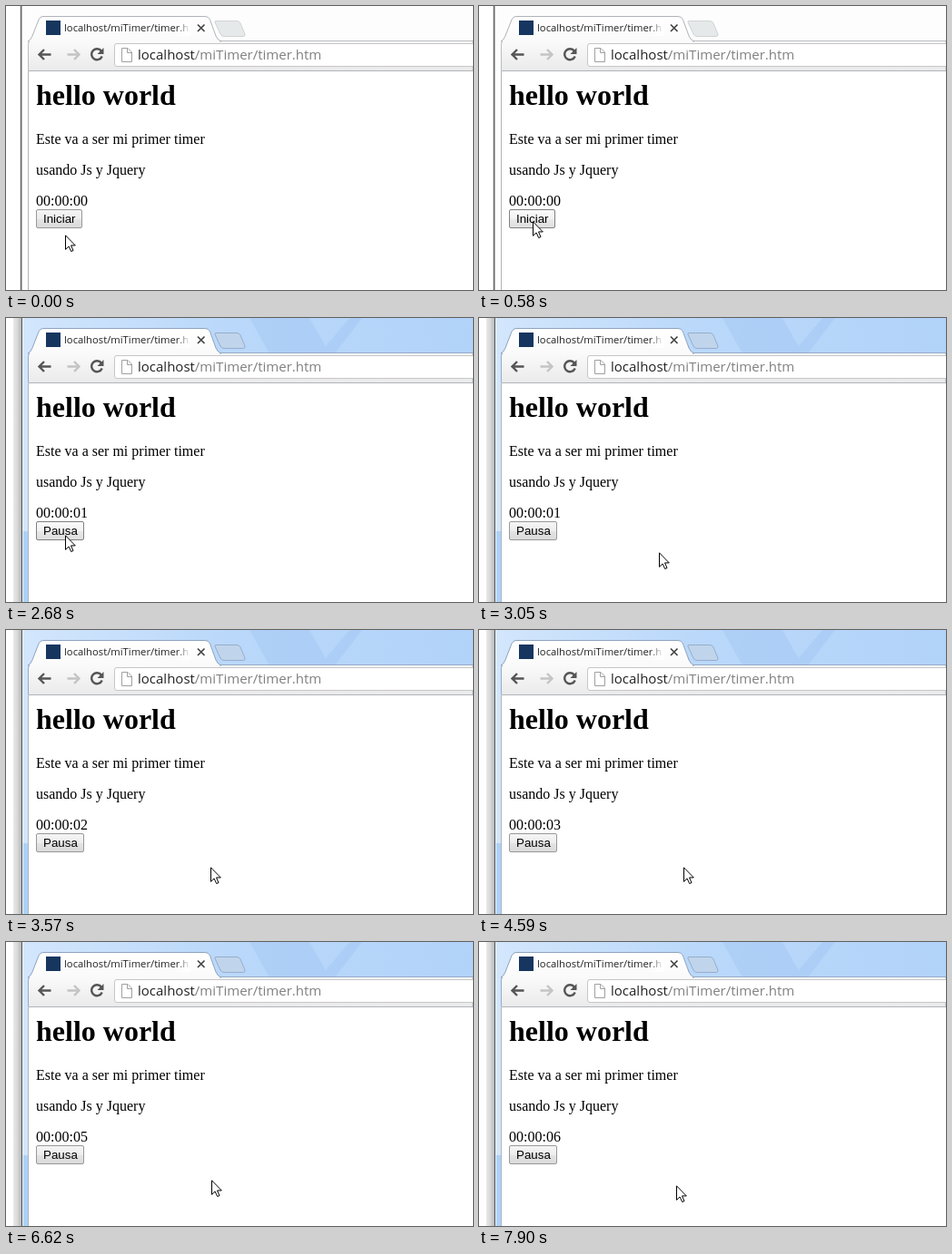
Recreate the animation shown at these times as an HTML page. Size 514 px wide and 313 px high, loop 8000 ms.

```html
<!DOCTYPE html>
<html lang="es">
<head>
<meta charset="utf-8">
<title>Timer</title>
<style>
  html, body { margin: 0; width: 100%; height: 100%; overflow: hidden; background: #fff; }
  svg { display: block; width: 514px; height: 313px; }
  text { white-space: pre; }
  .ui { font-family: "Open Sans", "Noto Sans", sans-serif; }
  .page { font: 16px "Liberation Serif", "Times New Roman", serif; }
  .label { font: 13.333px "Liberation Sans", Arial, sans-serif; }
</style>
</head>
<body>
<svg viewBox="0 0 514 313">
  <defs>
    <linearGradient id="shadow">
      <stop offset="0" stop-color="#e9e9e9"/><stop offset=".5" stop-color="#d8d8d8"/><stop offset="1" stop-color="#b8b8b8"/>
    </linearGradient>
    <linearGradient id="sky">
      <stop offset="0" stop-color="#d3e6fc"/><stop offset=".45" stop-color="#bad8fa"/><stop offset="1" stop-color="#b2d3f9"/>
    </linearGradient>
    <linearGradient id="bar" x2="0" y2="1">
      <stop offset="0" stop-color="#fafafa"/><stop offset="1" stop-color="#eaeaea"/>
    </linearGradient>
    <linearGradient id="tabFill" x2="0" y2="1">
      <stop offset="0" stop-color="#fff"/><stop offset="1" stop-color="#fafafa"/>
    </linearGradient>
    <linearGradient id="face" x2="0" y2="1">
      <stop offset="0" stop-color="#f5f5f5"/><stop offset=".5" stop-color="#ededed"/>
      <stop offset=".5" stop-color="#e4e4e4"/><stop offset="1" stop-color="#dadada"/>
    </linearGradient>
    <linearGradient id="hoverFace" x2="0" y2="1">
      <stop offset="0" stop-color="#fafafa"/><stop offset=".5" stop-color="#f2f2f2"/>
      <stop offset=".5" stop-color="#e9e9e9"/><stop offset="1" stop-color="#dedede"/>
    </linearGradient>
    <linearGradient id="downFace" x2="0" y2="1">
      <stop offset="0" stop-color="#e2e3e8"/><stop offset=".6" stop-color="#ebecf0"/>
      <stop offset=".6" stop-color="#f5f5f7"/><stop offset="1" stop-color="#f9f9f9"/>
    </linearGradient>
    <linearGradient id="fade">
      <stop offset="0" stop-color="#fff" stop-opacity="0"/><stop offset="1" stop-color="#fff"/>
    </linearGradient>
    <clipPath id="titleClip"><rect x="62" y="14" width="140" height="20"/></clipPath>
  </defs>

  <rect width="514" height="313" fill="#fff"/>

  <g id="idle">
    <rect x="17" width="497" height="313" fill="#fdfdfe"/>
    <rect x="15" width="1" height="313" fill="#d8d8d8"/>
    <rect x="16" width="1.5" height="313" fill="#666"/>
  </g>
  <g id="active">
    <rect x="8" width="9" height="313" fill="url(#shadow)"/>
    <rect x="18" width="496" height="313" fill="url(#sky)"/>
    <path d="M268 0H334L356 39H290ZM378 0H392L362 39H345Z" fill="#a3c8f3" opacity=".5"/>
    <rect x="18" y="235" width="7" height="78" fill="#acd2f8"/>
    <rect x="17" width="1" height="313" fill="#50565e"/>
    <rect x="18" width="1" height="313" fill="#eef6ff"/>
  </g>

  <path id="newTab" d="M231 16.500H254Q257 16.500 258 19L263 31Q263.500 33.500 261 33.500H240Q237 33.500 236 31L230 18Q229.500 16.500 231 16.500Z"/>
  <path id="toolbar" d="M24.500 72V42Q24.500 38.500 28 38.500H514V72Z" fill="url(#bar)"/>
  <path id="tab" d="M24 39Q27 38 29 33L36 15Q37.500 11.500 41 11.500H219Q223 11.500 224.500 15L231 33Q233 38 237 39Z" fill="url(#tabFill)"/>
  <rect x="26" y="38" width="209" height="2" fill="#fafafa"/>

  <rect x="44" y="16" width="16" height="16" fill="#17365f"/>
  <text class="ui" x="64" y="28" font-size="11.250" fill="#222" clip-path="url(#titleClip)">localhost/miTimer/timer.htm</text>
  <rect x="188" y="15" width="15" height="18" fill="url(#fade)"/>
  <path d="M211 20.500L218.500 28M218.500 20.500L211 28" stroke="#444" stroke-width="1.700"/>

  <g fill="none" stroke-width="2.400">
    <path d="M49.500 53.500H36.500M42 48L36.500 53.500L42 59" stroke="#555"/>
    <path d="M67.500 53.500H80.500M75 48L80.500 53.500L75 59" stroke="#c4c4c4"/>
    <path d="M105 49.700A6 6 0 1 0 105.700 55.500" stroke="#555"/>
  </g>
  <path d="M107.500 46V53H100.500Z" fill="#555"/>

  <path d="M514 41.500H122Q119.500 41.500 119.500 44V64Q119.500 66.500 122 66.500H514" fill="#fff" stroke="#c6c6c6"/>
  <path d="M127.500 46.500H134L138.500 51V61.500H127.500ZM133.500 46.500V51.500H138.500" fill="#fff" stroke="#a0a0a0"/>
  <text class="ui" x="145" y="59" font-size="15" fill="#222">localhost<tspan fill="#808080">/miTimer/timer.htm</tspan></text>

  <rect x="24" y="71" width="490" height="242" fill="#fff"/>
  <path d="M24.500 313V71.500H514" fill="none" stroke="#b0b4ba"/>

  <g class="page">
    <text x="33" y="109" font-size="32" font-weight="bold">hello world</text>
    <text x="33" y="152">Este va a ser mi primer timer</text>
    <text x="33" y="186">usando Js y Jquery</text>
    <text id="clock" x="33" y="220">00:00:00</text>
  </g>
  <rect id="button" x="33.500" y="224.500" width="50" height="20" rx="1.500"/>
  <text id="label" class="label" x="41" y="239">Iniciar</text>

  <path id="cursor" d="M.5 .8V16.300L4.100 12.900L6.700 18.500L9 17.500L6.500 11.900H11.300Z" fill="#fff" stroke="#000" stroke-linejoin="round"/>
</svg>
<script>
const LOOP = 8000;
const $ = id => document.getElementById(id);

// [start ms, x, y] of the pointer tip
const pointer = [
  [0, 65, 252], [270, 61, 247], [430, 59, 238], [580, 59, 237],
  [2680, 65, 239], [2800, 88, 243], [2920, 143, 251], [3050, 198, 258], [3170, 224, 261],
  [3570, 225, 261], [4740, 226, 262], [7610, 226, 263], [7760, 223, 266], [7900, 217, 268]
];
const ticks = [2680, 3570, 4590, 5550, 6620, 7490];

function set(id, attrs) {
  for (const name in attrs) $(id).setAttribute(name, attrs[name]);
}

function draw(t) {
  const focused = t >= 2040;
  const running = t >= 2170;
  const pressed = focused && !running;
  const hover = t >= 430 && t < 2800;

  set('idle', { visibility: focused ? 'hidden' : 'visible' });
  set('active', { visibility: focused ? 'visible' : 'hidden' });
  set('newTab', { fill: focused ? '#c0d5ec' : '#e5e9ea', stroke: focused ? '#96aeca' : '#d0d3d5' });
  set('toolbar', { stroke: focused ? '#95abc6' : '#b9bcc0' });
  set('tab', { stroke: focused ? '#8da3be' : '#b0b3b7' });

  set('button', {
    width: running ? 52 : 50,
    fill: `url(#${pressed ? 'downFace' : hover ? 'hoverFace' : 'face'})`,
    stroke: pressed ? '#a8a8a8' : hover ? '#808080' : '#989898'
  });
  $('label').textContent = running ? 'Pausa' : 'Iniciar';
  $('clock').textContent = '00:00:0' + ticks.filter(at => t >= at).length;

  const [, x, y] = pointer.filter(([at]) => t >= at).pop();
  set('cursor', { transform: `translate(${x} ${y})` });
}

function loop() {
  draw(performance.now() % LOOP);
  requestAnimationFrame(loop);
}
loop();
</script>
</body>
</html>
```
